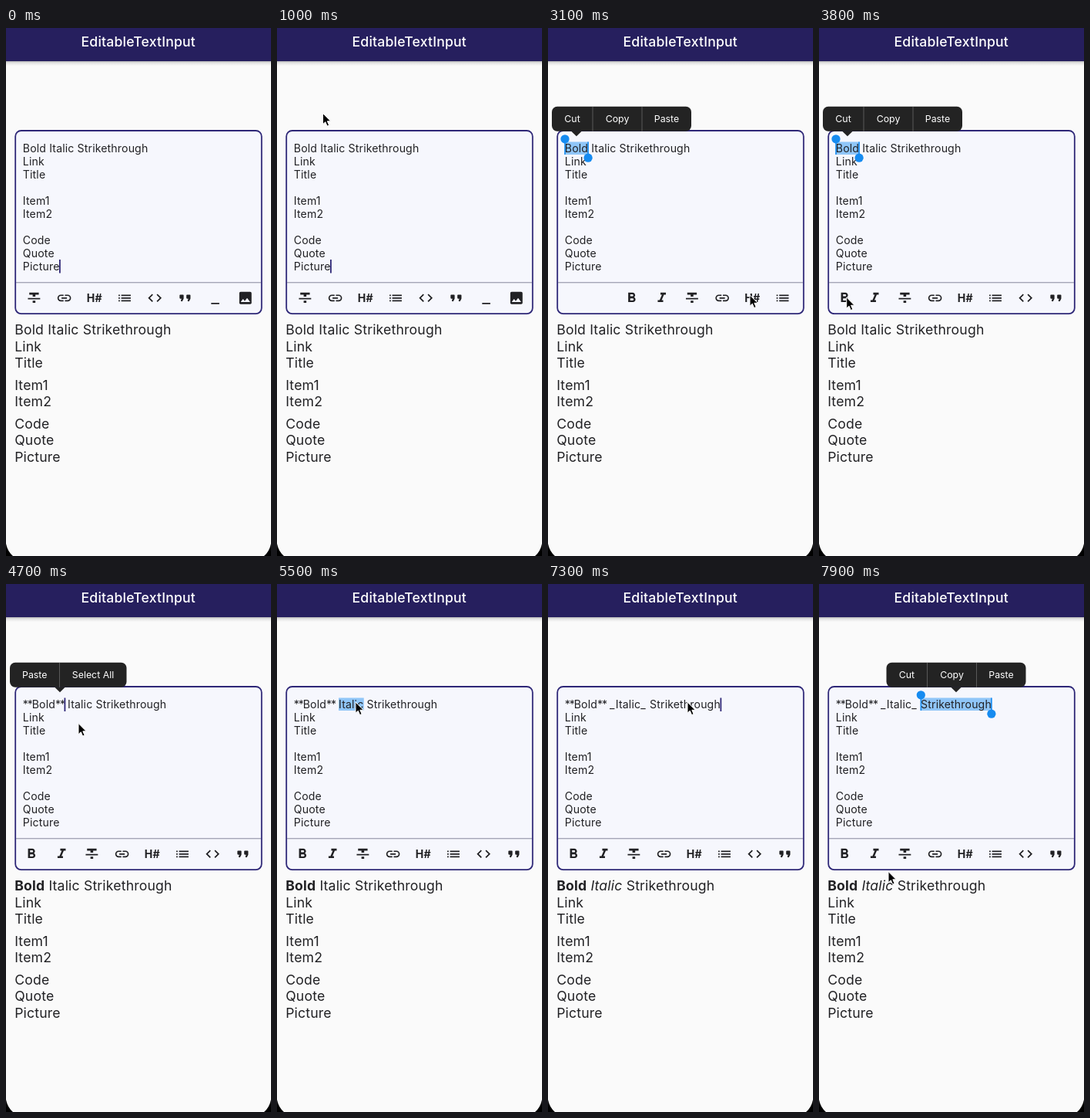
An HTML page that plays this animation: 344 by 684 pixels, repeating every 8000 ms.

```html
<!DOCTYPE html>
<html lang="en">
<head>
<meta charset="utf-8">
<title>EditableTextInput</title>
<style>
html, body { margin: 0; width: 100%; height: 100%; overflow: hidden; background: #fafafa; }
svg { display: block; width: 344px; height: 684px; font-family: Inter, Roboto, sans-serif; fill: #212124; }
text { white-space: pre; }
.title, .field, .view { letter-spacing: .01em; }
.title { font-size: 17.64px; font-weight: 500; fill: #fff; text-anchor: middle; }
.field { font-size: 14.1px; }
.view { font-size: 17.64px; }
.star { letter-spacing: -1.1px; }
.under { letter-spacing: 1.4px; }
.strong { font-weight: 700; }
.em { font-style: italic; }
.menu { font-size: 12.35px; fill: #fff; text-anchor: middle; }
</style>
</head>
<body>
<svg viewBox="0 0 344 684" xmlns="http://www.w3.org/2000/svg">
  <defs>
    <linearGradient id="shade" x2="0" y2="1">
      <stop stop-color="#000" stop-opacity=".26"/>
      <stop offset=".4" stop-color="#000" stop-opacity=".09"/>
      <stop offset="1" stop-color="#000" stop-opacity="0"/>
    </linearGradient>
    <clipPath id="barClip"><rect x="13" y="330" width="318" height="40" rx="7"/></clipPath>
  </defs>
  <rect width="344" height="684" fill="#fafafa"/>
  <rect y="43" width="344" height="6" fill="url(#shade)"/>
  <rect width="344" height="43" fill="#261f5e"/>
  <text class="title" x="171.8" y="24.2">EditableTextInput</text>
  <rect x="12.2" y="133" width="319.6" height="237.2" rx="7.5" fill="#f6f7fd" stroke="#2e2777" stroke-width="1.8"/>
  <rect id="mark" y="147.5" height="16.5" fill="#90c6f8"/>
  <g id="field" class="field"></g>
  <g id="view" class="view"></g>
  <rect id="caret" width="1.8" height="17.5" fill="#2e2777"/>
  <g clip-path="url(#barClip)"><g id="bar"></g></g>
  <path d="M13 329.8H331" stroke="#85859c"/>
  <g id="grips" fill="#168bf0">
    <g id="gripA"><rect x="-.8" y="144" width="1.6" height="20"/><circle cy="143.8" r="5.6"/></g>
    <g id="gripB"><rect x="-.8" y="147.5" width="1.6" height="20"/><circle cy="168.2" r="5.6"/></g>
  </g>
  <g id="menus"></g>
  <path d="M0 668Q2 678 9 684H0ZM344 668Q342 678 335 684H344Z" fill="#000"/>
  <path id="mouse" d="M0 0V14.2L3.3 11.2L5.6 16.6L8.1 15.5L5.8 10.3H10.2Z" fill="#000" stroke="#fff" stroke-linejoin="round"/>
</svg>
<script>
const LOOP = 8000, LEFT = 21.8, NS = "http://www.w3.org/2000/svg";
const $ = id => document.getElementById(id);
const put = (el, attrs) => { for (const k in attrs) el.setAttribute(k, attrs[k]); };
const shift = (el, x, y = 0) => put(el, { transform: `translate(${x} ${y})` });
const show = (el, on) => put(el, { visibility: on ? "visible" : "hidden" });
const ramp = (t, a, b) => Math.max(0, Math.min(1, (t - a) / (b - a)));
const smooth = k => k * k * (3 - 2 * k);

function add(parent, tag, attrs, label) {
  const el = document.createElementNS(NS, tag);
  put(el, attrs);
  if (label) el.textContent = label;
  return parent.appendChild(el);
}

// Paragraphs; the first line is filled in by setLine
function column(parent, x, top, line, gap) {
  let y = top - gap;
  const lines = [["", "Link", "Title"], ["Item1", "Item2"], ["Code", "Quote", "Picture"]].flatMap(par => {
    y += gap;
    return par.map(word => {
      const el = add(parent, "text", { x, y }, word);
      y += line;
      return el;
    });
  });
  return lines[0];
}
const fieldLine = column($("field"), LEFT, 161, 16.96, 16.96);
const viewLine = column($("view"), 11.2, 397.3, 21.45, 7.1);

// Toolbar
const STEP = 39.2;
const icons = [
  "M15.6 10.79c.97-.67 1.65-1.77 1.65-2.79 0-2.26-1.75-4-4-4H7v14h7.04c2.09 0 3.71-1.7 3.71-3.79 0-1.52-.86-2.82-2.15-3.42zM10 6.5h3c.83 0 1.5.67 1.5 1.5s-.67 1.5-1.5 1.5h-3v-3zm3.5 9H10v-3h3.5c.83 0 1.5.67 1.5 1.5s-.67 1.5-1.5 1.5z",
  "M10 4v3h2.21l-3.42 8H6v3h8v-3h-2.21l3.42-8H18V4z",
  "M10 19h4v-3h-4zM5 4v3h5v3h4V7h5V4zM3 14h18v-2H3z",
  "M3.9 12c0-1.71 1.39-3.1 3.1-3.1h4V7H7a5 5 0 0 0 0 10h4v-1.9H7c-1.71 0-3.1-1.39-3.1-3.1zM8 13h8v-2H8zM17 7h-4v1.9h4a3.1 3.1 0 0 1 0 6.2h-4V17h4a5 5 0 0 0 0-10z",
  "",
  [7, 11, 15].map(y => `M3 ${y}h2v2H3zM7 ${y}h14v2H7z`).join(""),
  "M9.4 16.6L4.8 12l4.6-4.6L8 6l-6 6 6 6zM14.6 16.6l4.6-4.6-4.6-4.6L16 6l6 6-6 6z",
  [7.17, 17.17].map(x => `M${x} 17c.51 0 .98-.29 1.2-.74l1.42-2.84c.14-.28.21-.58.21-.89V8c0-.55-.45-1-1-1h-4c-.55 0-1 .45-1 1v4c0 .55.45 1 1 1h2l-1.03 2.06c-.45.89.2 1.94 1.2 1.94z`).join(""),
  "M6 19h12v2H6z",
  "M21 19V5c0-1.1-.9-2-2-2H5c-1.1 0-2 .9-2 2v14c0 1.1.9 2 2 2h14c1.1 0 2-.9 2-2zM8.5 13.5l2.5 3.01L14.5 12l4.5 6H5z"
];
const buttonX = i => 33 + i * STEP;
const press = add($("bar"), "rect", { y: 330, width: STEP, height: 40, fill: "#1c1c20" });
icons.forEach((d, i) => {
  const x = buttonX(i);
  if (d) add($("bar"), "path", { d, transform: `translate(${x} 349.8) scale(.882) translate(-12 -12)` });
  else add($("bar"), "text", { x, y: 354.9, class: "field strong", "text-anchor": "middle" }, "H#");
});

// Context menus: each item is a label and its width
function makeMenu(items) {
  const g = add($("menus"), "g", {});
  const width = items.reduce((sum, [, w]) => sum + w, 0);
  add(g, "rect", { y: 101.8, width, height: 32, rx: 7, fill: "#232323" });
  const tip = add(g, "path", { d: "M-7 133.5H7L0 140.2Z", fill: "#232323" });
  let x = 0;
  for (const [label, w] of items) {
    if (x) add(g, "path", { d: `M${x} 102V133.8`, stroke: "#606060", "stroke-width": .9 });
    add(g, "text", { x: x + w / 2, y: 121.8, class: "menu" }, label);
    x += w;
  }
  return { g, tip, width };
}
const editMenu = makeMenu([["Cut", 53], ["Copy", 64], ["Paste", 64]]);
const pasteMenu = makeMenu([["Paste", 64.5], ["Select All", 87]]);
function placeMenu({ g, tip, width }, on, centre) {
  show(g, on);
  const x = Math.max(5, centre - width / 2);
  shift(g, x);
  shift(tip, centre - x);
}

// Each word is tapped, marked, given a menu and then formatted
const edits = [
  { word: "Bold", sign: "**", kind: "star", look: "strong", tap: 1600, mark: 1800, menu: 2200, apply: 4200 },
  { word: "Italic", sign: "_", kind: "under", look: "em", tap: 5300, mark: 5500, menu: 5600, apply: 6500 },
  { word: "Strikethrough", tap: 7200, mark: 7400, menu: 7600, apply: LOOP }
];

// Fills the first line and measures where each word and closing sign lie
let spans = [], done = -1;
function setLine(count) {
  fieldLine.textContent = viewLine.textContent = "";
  let at = 0;
  const ranges = edits.map(({ word, sign, kind, look }, i) => {
    const on = i < count, s = on ? sign : "";
    if (i) {
      add(fieldLine, "tspan", {}, " ");
      add(viewLine, "tspan", {}, " ");
      at++;
    }
    if (on) add(fieldLine, "tspan", { class: kind }, s);
    add(fieldLine, "tspan", {}, word);
    if (on) add(fieldLine, "tspan", { class: kind }, s);
    add(viewLine, "tspan", on ? { class: look } : {}, word);
    const from = at, close = at + s.length + word.length;
    at = close + s.length;
    return { from, close, to: at };
  });
  const endX = i => i ? fieldLine.getEndPositionOfChar(i - 1).x : LEFT;
  spans = ranges.map(r => ({ a: endX(r.from), close: endX(r.close), b: endX(r.to) }));
  done = count;
}

// Pointer moves: start, end, x, y
const moves = [
  [100, 300, 281, 443], [500, 600, 178, 413], [750, 1000, 59.5, 110.5], [1150, 1550, 33, 152],
  [1800, 2050, 95, 352], [2350, 3000, 262, 346], [3200, 3850, 32, 349], [4250, 4700, 94, 180.5],
  [4700, 5000, 102, 153], [5600, 6100, 72, 349.5], [6550, 7150, 181, 153], [7450, 7900, 90, 372.5]
];
function pointer(t) {
  let x = 281, y = 541;
  for (const [a, b, tx, ty] of moves) {
    const k = smooth(ramp(t, a, b));
    x += (tx - x) * k;
    y += (ty - y) * k;
  }
  return [x, y];
}

// Dragged past its start, then springs back
function scroll(t) {
  return t < 3100 ? 75 - 151 * smooth(ramp(t, 2350, 3000)) : -76 * (1 - ramp(t, 3100, 3600)) ** 3;
}

function draw(t) {
  const count = edits.filter(e => t >= e.apply).length;
  if (count !== done) setLine(count);

  const now = edits.filter(e => t >= e.tap).length - 1;
  const edit = edits[now], span = spans[now];
  const applied = !!edit && t >= edit.apply;
  const marked = !!edit && t >= edit.mark && !applied;
  const open = marked && t >= edit.menu;

  show($("caret"), edit ? !marked : t < 500 || t >= 900);
  put($("caret"), edit ? { x: span.b - .4, y: 147.5 } : { x: 69, y: 300 });
  show($("mark"), marked);
  show($("grips"), open);
  if (marked) {
    put($("mark"), { x: span.a, width: span.b - span.a + .4 });
    shift($("gripA"), span.a + .2);
    shift($("gripB"), span.b);
  }
  placeMenu(editMenu, open, span ? (span.a + span.b) / 2 : 0);
  placeMenu(pasteMenu, applied, span ? (span.close + span.b) / 2 : 0);

  const since = applied ? t - edit.apply : LOOP;
  put(press, { x: buttonX(Math.max(0, now)) - STEP / 2, opacity: .07 * (1 - ramp(since, 150, 350)) });
  shift($("bar"), -scroll(t));
  show($("mouse"), t >= 100);
  shift($("mouse"), ...pointer(t));
}

const start = performance.now();
function tick() {
  draw((performance.now() - start) % LOOP);
  requestAnimationFrame(tick);
}
tick();
</script>
</body>
</html>
```
